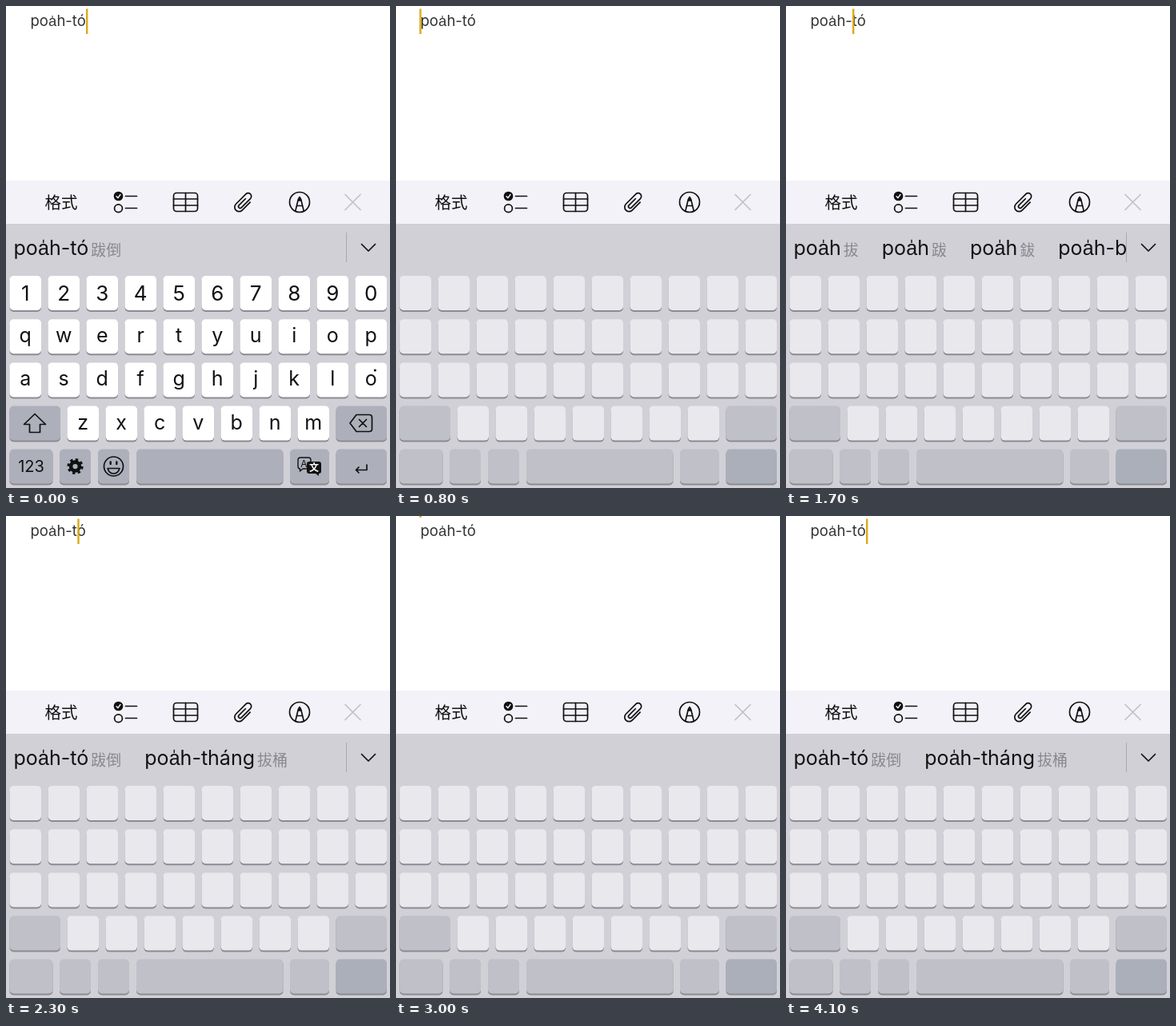
Recreate the animation shown at these times as an HTML page. Size 480 by 602 pixels, loop 4200 ms.

```html
<!DOCTYPE html>
<html lang="nan">
<head>
<meta charset="utf-8">
<title>Keyboard caret drag</title>
<style>
html, body { margin: 0; height: 100%; overflow: hidden; background: #fff; }
svg { display: block; width: 100vw; height: 100vh; }
text { font-family: Inter, "Noto Sans CJK TC", "Noto Sans CJK", sans-serif; white-space: pre; }
.line { fill: none; stroke: #111; stroke-width: 1.7; stroke-linecap: round; stroke-linejoin: round; }
.han { font-size: 19px; fill: #88888e; }
#labels text { text-anchor: middle; }
</style>
</head>
<body>
<svg viewBox="0 0 480 602">
  <clipPath id="strip"><rect y="272" width="425" height="60"/></clipPath>
  <rect width="480" height="602" fill="#fff"/>
  <text x="30.5" y="25" font-size="18.5" fill="#333">poa̍h-tó</text>
  <rect id="caret" y="3.5" width="2.4" height="31.5" fill="#dcaa18"/>

  <rect y="218" width="480" height="54" fill="#f3f2f8"/>
  <rect y="272" width="480" height="330" fill="#d1d0d6"/>
  <text x="48.5" y="253" font-size="20.5" fill="#111">格式</text>
  <g class="line">
    <circle cx="140.5" cy="237.5" r="5" fill="#111"/>
    <path d="M138 237.7l2 2 3-4.2" stroke="#fff" stroke-width="1.3"/>
    <circle cx="140.5" cy="252.7" r="4.9"/>
    <path d="M149.5 237.5H163.5M149.5 252.5H163.5"/>
    <rect x="209.5" y="233.5" width="30" height="23" rx="3.5"/>
    <path d="M224.5 233.5V256.5M209.5 241H239.5M209.5 249H239.5"/>
    <path transform="translate(297 245.5) rotate(45)" d="M5.5-6V8A5.5 5.5 0 0 1-5.5 8V-9.5A4 4 0 0 1 2.5-9.5V6.5A2.1 2.1 0 0 1-1.7 6.5V-5"/>
    <circle cx="367" cy="245" r="12.5"/>
    <path d="M361.8 256L365.3 241.5Q367 237 368.7 241.5L372.2 256M363.5 249.5H370.5"/>
    <path d="M365.5 243L367 238.5 368.5 243Z" fill="#111"/>
    <path d="M424 235.5L443 254.5M443 235.5L424 254.5" stroke="#c2c1c7"/>
  </g>

  <g id="bar">
    <g clip-path="url(#strip)"><text id="words" x="9.5" y="311" font-size="25" fill="#111"></text></g>
    <path d="M425.5 283V320" stroke="#a9a9b0"/>
    <path class="line" d="M444.5 297.5L453 306 461.5 297.5" stroke-width="2.2"/>
  </g>

  <g id="keys"></g>
  <g id="labels" fill="#111">
    <text x="31.5" y="582" font-size="20">123</text>
    <circle cx="461.3" cy="455" r="1.6"/>
    <g class="line">
      <path d="M36 509.5L22.5 522.5H29.5V532.5H42.5V522.5H49.5Z"/>
      <path d="M438 510.5H454Q457.5 510.5 457.5 514V528Q457.5 531.5 454 531.5H438L430 521ZM441.5 516.5L450.5 525.5M450.5 516.5L441.5 525.5"/>
      <circle cx="86.5" cy="575" r="5.4" stroke-width="4.6"/>
      <circle cx="86.5" cy="575" r="8.4" stroke-width="3.4" stroke-linecap="butt" stroke-dasharray="3.3"/>
      <circle cx="134.5" cy="575" r="12"/>
      <path d="M127 577.5H142Q140 584 134.5 584 129 584 127 577.5Z"/>
      <path d="M130.7 569.5V572M138.3 569.5V572" stroke-width="2.4"/>
      <path d="M368 564H378Q381 564 381 567V575Q381 578 378 578H371L367.5 581V578Q365 578 365 575V567Q365 564 368 564Z" stroke-width="1.4"/>
      <path d="M451 573V579.5H437.5M441 576L437.5 579.5 441 583"/>
    </g>
    <path d="M379 569H391Q394 569 394 572V581Q394 584 391 584V587L387 584H379Q376 584 376 581V572Q376 569 379 569Z"/>
    <text x="372.5" y="575.5" font-size="12">A</text>
    <text x="385" y="581" font-size="12" fill="#fff" font-weight="700">文</text>
  </g>
</svg>
<script>
const $ = id => document.getElementById(id);

function add(parent, tag, attrs, text = "") {
  const el = document.createElementNS("http://www.w3.org/2000/svg", tag);
  for (const name in attrs) el.setAttribute(name, attrs[name]);
  el.textContent = text;
  parent.append(el);
  return el;
}

// Each key fades between its active and dimmed grey.
const WHITE = [[255, 255, 255], [233, 232, 237]];
const GREY = [[173, 176, 187], [191, 192, 200]];
const RETURN = [[173, 176, 187], [171, 175, 186]];
const keys = [];

function addKey(x, y, w, shades) {
  const box = { x, width: w, height: 43, rx: 5 };
  add($("keys"), "rect", { ...box, y: y + 2, fill: "#8b8b93" });
  keys.push({ el: add($("keys"), "rect", { ...box, y }), shades });
}

["1234567890", "qwertyuiop", "asdfghjklo", "zxcvbnm"].forEach((row, r) => {
  [...row].forEach((char, i) => {
    const x = (r == 3 ? 76.5 : 4.5) + 48 * i, y = 337 + 54.2 * r;
    addKey(x, y, 39.5, WHITE);
    add($("labels"), "text", { x: x + 19.7, y: y + (r ? 29 : 31), "font-size": r ? 25 : 26 }, char);
  });
});
addKey(4.5, 499.5, 63.5, GREY);
addKey(412.5, 499.5, 63.5, GREY);
for (const [x, w] of [[4.5, 54], [67, 39], [115, 39], [163, 183.5], [355, 49]]) addKey(x, 553.5, w, GREY);
addKey(412.5, 553.5, 63.5, RETURN);

// Caret stops and suggestions, by number of characters before the caret.
const STOPS = [30.5, 42, 53.5, 53.5, 64.7, 75.5, 84.2, 90.5, 101.2];
const poah = "poa̍h 拔,poa̍h 跋,poa̍h 鈸,";
const WORDS = [
  "",
  "pí 比,pê 爬,pó 寶,pàng 放",
  "pó 寶,pò 報,pòa 簸,poah 撥",
  "pòa 簸,poah 缽,poah 撥,poan 搬",
  poah + "poa̍t 拔",
  poah + "poa̍h-bîn 跋眠",
  poah + "poa̍h-bîn 跋眠",
  "poa̍h-tó 跋倒,poa̍h-tháng 拔桶",
  "poa̍h-tó 跋倒"
];
const STEP = 100;
const CARET = "875432100012345556788887543210000012345788";
const SHOWN = "875432110012344555778887543210000012345777";

let shown = -1;
function suggest(n) {
  if (n == shown) return;
  shown = n;
  $("bar").style.display = n ? "" : "none";
  $("words").textContent = "";
  if (n) WORDS[n].split(",").forEach((pair, i) => {
    const [word, han] = pair.split(" ");
    add($("words"), "tspan", { dx: i ? 29 : 0 }, word);
    add($("words"), "tspan", { dx: 3, dy: .5, class: "han" }, han);
    add($("words"), "tspan", { dy: -.5 }, "\u200b");
  });
}

function draw(now) {
  const tick = Math.floor(now / STEP) % CARET.length;
  const lit = Math.max(0, 1 - tick / 6) ** 3;
  const above = tick >= 30 && tick < 34;
  $("caret").setAttribute("x", STOPS[CARET[tick]] - 1.2);
  $("caret").setAttribute("y", above ? -29.5 : 3.5);
  suggest(+SHOWN[tick]);
  $("labels").setAttribute("opacity", lit);
  for (const { el, shades: [on, off] } of keys) {
    el.setAttribute("fill", `rgb(${on.map((c, i) => Math.round(off[i] + (c - off[i]) * lit))})`);
  }
}

const start = performance.now();
(function loop() {
  draw(performance.now() - start);
  requestAnimationFrame(loop);
})();
</script>
</body>
</html>
```
